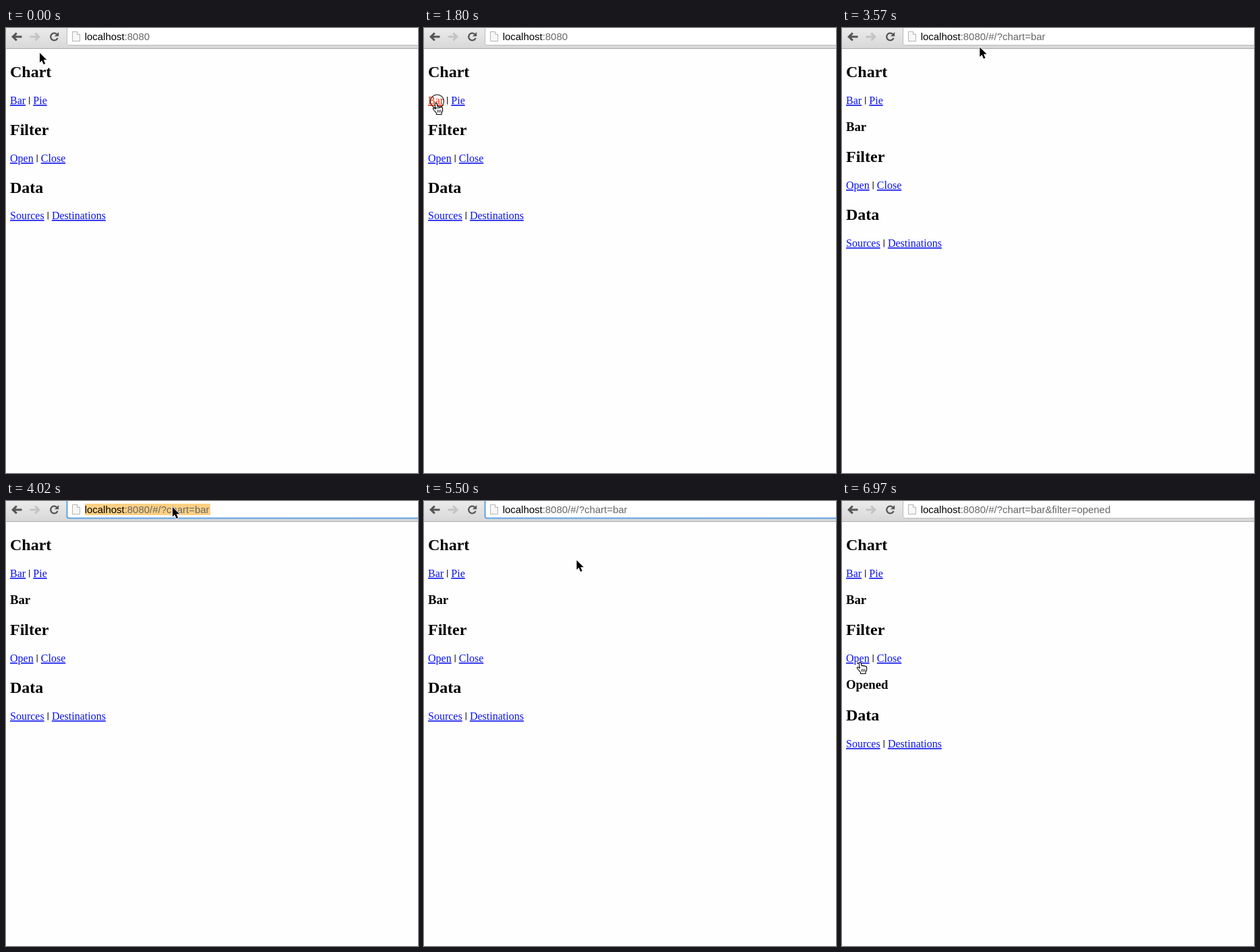
Recreate the animation shown at these times as an HTML page. Size 611 by 661 pixels, loop 8 s.

```html
<!DOCTYPE html>
<html lang="en">
<head>
<meta charset="utf-8">
<title>Query links</title>
<style>
  html, body { margin: 0; width: 100%; height: 100%; overflow: hidden; background: #fefefe; }
  svg { display: block; width: 611px; height: 661px; }
  text { white-space: pre; }
  .page { font-family: "Liberation Serif", Times, serif; font-size: 16px; }
  .h2 { font-size: 24px; font-weight: bold; }
  .h3 { font-size: 18.72px; font-weight: bold; }
  .link { fill: #0a12ee; text-decoration: underline; }
  .active { fill: #ff2600; }
  .url { font-family: "Liberation Sans", Arial, sans-serif; font-size: 14.95px; fill: #666; }
  .ring { fill: none; stroke: #111; stroke-width: 1.1; }
</style>
</head>
<body>
<svg viewBox="0 0 611 661">
  <defs>
    <linearGradient id="bar" x2="0" y2="1">
      <stop stop-color="#ebebeb"/><stop offset="1" stop-color="#d8d8d8"/>
    </linearGradient>
    <path id="back" d="M8 13l6.7-6.5 2.1 2.1-2.8 2.8h9.5v3.2h-9.5l2.8 2.8-2.1 2.1z"/>
    <path id="arrow" d="M0 0v14.2l3.2-3 2.5 5.8 2.5-1.1-2.5-5.6h4.6z" stroke="#fff" paint-order="stroke" stroke-width="1.6"/>
    <g id="ibeam" fill="none">
      <path id="beam" d="M-3.5-7.5q3 0 3.5 2v11q-.5 2-3.5 2M3.5-7.5q-3 0-3.5 2v11q.5 2 3.5 2M-2 1.5h4" stroke="#fff" stroke-width="2.4"/>
      <path d="M-3.5-7.5q3 0 3.5 2v11q-.5 2-3.5 2M3.5-7.5q-3 0-3.5 2v11q.5 2 3.5 2M-2 1.5h4" stroke="#000" stroke-width="1.1"/>
    </g>
    <g id="hand" stroke="#000" stroke-width="1.1" stroke-linejoin="round">
      <path fill="#fff" d="M-1.8 1.6q.8-2 2.6-.6l1.6 5q1.2-1.2 2.6.2 1.4-.9 2.6.5 1.6-.5 2 1.3v4.2l-1.6 3v2.3h-7.4v-1.8l-3.5-4.2-1.8-2.5q.3-1.8 2.2-1l1.7 1.3z"/>
      <path fill="none" stroke-width=".9" d="M2.5 10.5v4M4.7 10.5v4M6.9 10.5v4"/>
    </g>
  </defs>

  <rect width="611" height="661" fill="#fefefe"/>
  <rect width="611" height="30" fill="url(#bar)"/>
  <path d="M0 30.5h611" stroke="#a8a8a8"/>
  <use href="#back" fill="#555"/>
  <use href="#back" fill="#c4c4c4" transform="matrix(-1 0 0 1 59 0)"/>
  <path d="M75.2 9.2a5.3 5.3 0 1 0 1.3 5.6" fill="none" stroke="#555" stroke-width="2.3"/>
  <path d="M78.2 6v6.3h-6.3z" fill="#555"/>
  <path id="box" d="M620-5H90.5V22.5q0 3 3 3H620z" fill="#fff"/>
  <path d="M98.5 5.5h7l4 4v10h-11z" fill="#f7f7f7" stroke="#b4b4b4"/>
  <path d="M105.5 5.5v4h4" fill="#fff" stroke="#b4b4b4"/>
  <g id="view"></g>
</svg>
<script>
const LOOP = 8000, STEP = 148;
const box = document.getElementById("box"), view = document.getElementById("view");

// start, end, target x, target y, shape while moving, shape at rest
const moves = [
  [0, 900, 17, 114, "arrow", "hand"],
  [1050, 1200, 18, 111, "hand", "hand"],
  [2690, 2840, 31.5, 107.5, "hand", "ibeam"],
  [2840, 3870, 247, 9, "arrow", "arrow"],
  [4020, 4760, 302.5, 18, "arrow", "ibeam"],
  [5060, 6240, 62, 239, "arrow", "hand"],
  [6240, 6530, 27, 239, "hand", "hand"]
];

// time, length, centre x, centre y
const clicks = [[1800, 140, 19.5, 109], [3870, 150, 248, 10], [4760, 150, 303.5, 18.5], [6820, 150, 28.5, 237]];

const within = (t, from, to) => t >= from && t < to;
const text = (x, y, cls, s) => `<text x="${x}" y="${y}" class="${cls}">${s}</text>`;

function pointer(t) {
  let x = 50, y = 37, shape = "arrow";
  for (const [from, to, tx, ty, moving, rest] of moves) {
    if (t < from) break;
    const n = Math.round((to - from) / STEP);
    const u = Math.min(1, Math.floor((t - from) / (to - from) * n + 0.1) / n);
    if (!u) break;
    const e = u * u * (3 - 2 * u);
    x += (tx - x) * e;
    y += (ty - y) * e;
    shape = u < 1 ? moving : rest;
  }
  return `<use href="#${shape}" x="${x.toFixed(1)}" y="${y.toFixed(1)}"/>`;
}

function section(y, linkY, title, links, gap, active) {
  const link = (x, s, on) => text(x, linkY, on ? "link active" : "link", s);
  return text(6, y, "h2", title) + link(6, links[0], active) + link(gap + 5.6, links[1]) +
    `<path d="M${gap} ${linkY - 11}v11.5" stroke="#222" stroke-width="1.2"/>`;
}

function page(t) {
  const bar = t >= 1940, opened = t >= 6970;
  const s = bar ? 40 : 0, d = s + (opened ? 41 : 0);
  return `<g class="page">` +
    section(73, 113, "Chart", ["Bar", "Pie"], 34.7, within(t, 1800, 1940)) +
    (bar ? text(6, 153, "h3", "Bar") : "") +
    section(159 + s, 199 + s, "Filter", ["Open", "Close"], 46.2, within(t, 6820, 6970)) +
    (opened ? text(6, 279, "h3", "Opened") : "") +
    section(245 + d, 284 + d + (bar ? 1 : 0), "Data", ["Sources", "Destinations"], 62.3) + `</g>`;
}

function address(t) {
  const query = t < 1940 ? "" : "/#/?chart=bar" + (t < 6970 ? "" : "&amp;filter=opened");
  const selected = within(t, 3870, 4760);
  const caret = within(t, 4760, 5360) || within(t, 5800, 6380);
  return (selected ? `<rect x="117" y="4" width="186" height="17" fill="#ffd083"/>` : "") +
    text(116.7, 18, "url", `<tspan fill="#000">localhost</tspan>:8080${query}`) +
    (caret ? `<path d="M302.5 4v17" stroke="#000"/>` : "");
}

function draw(t) {
  const focus = within(t, 3870, 6820);
  box.setAttribute("stroke", focus ? "#5ea3e6" : "#b9b9b9");
  box.setAttribute("stroke-width", focus ? 2 : 1);
  const rings = clicks.filter(([at, len]) => within(t, at, at + len))
    .map(([, , x, y]) => `<circle class="ring" cx="${x}" cy="${y}" r="10"/>`).join("");
  return address(t) + page(t) + pointer(t) + rings;
}

let shown, start = performance.now();
function tick() {
  const markup = draw((performance.now() - start) % LOOP);
  if (markup !== shown) view.innerHTML = shown = markup;
  requestAnimationFrame(tick);
}
tick();
</script>
</body>
</html>
```
